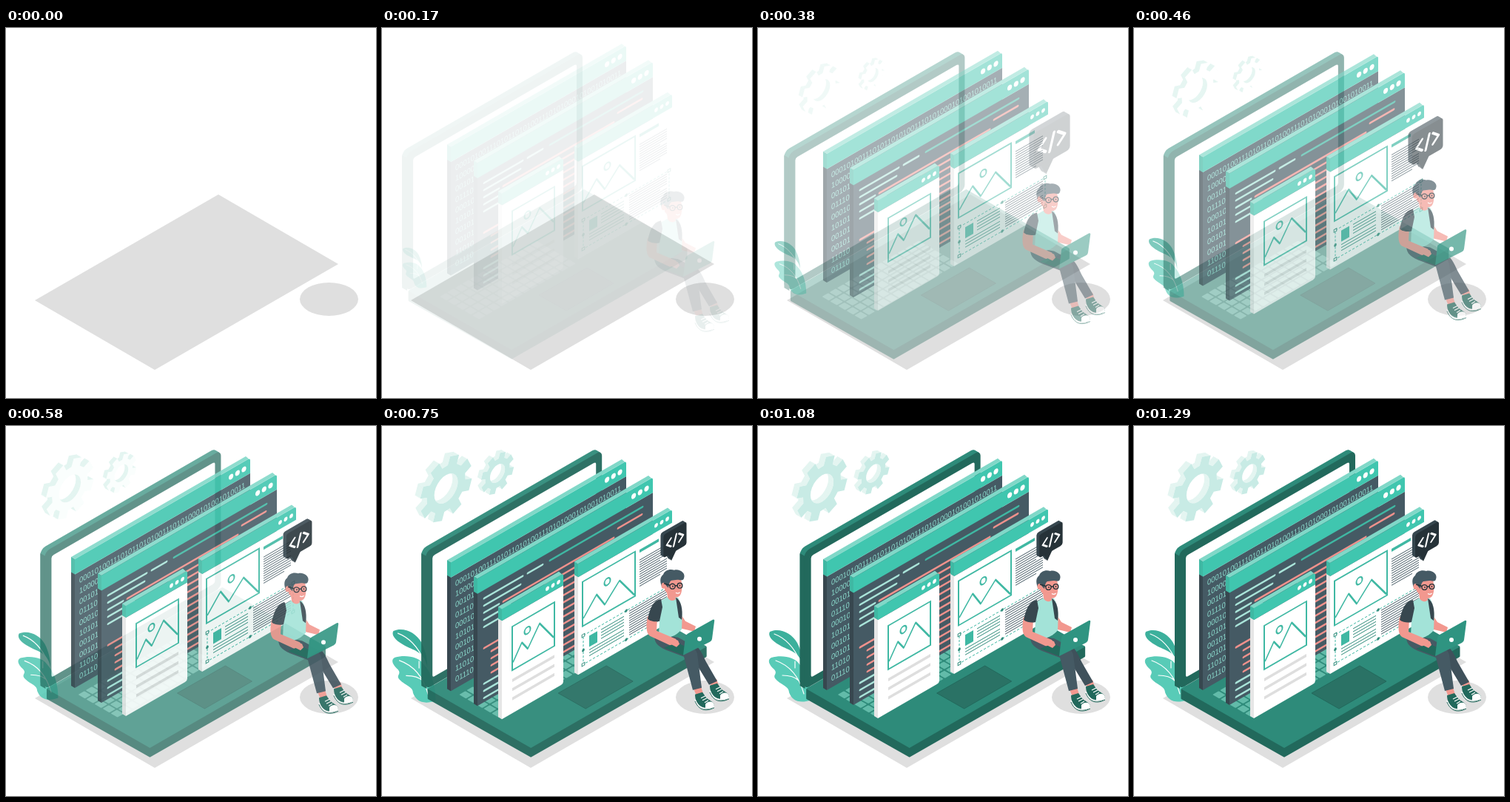
An HTML page that plays this animation: 500x500 px, repeating every 1.33 s.

```html
<!DOCTYPE html>
<html lang="en">
<head>
<meta charset="utf-8">
<title>Web development</title>
<style>
html, body { margin: 0; width: 100%; height: 100%; overflow: hidden; background: #fff; }
svg { display: block; width: 100vw; height: 100vh; }
</style>
</head>
<body>
<svg id="stage" viewBox="0 0 500 500"></svg>
<script>
const SLOPE = 0.577;
const TEAL = '#40c6af', MID = '#3fb8a3', GREEN = '#2e8b7a', DEEP = '#22695c';
const SLATE = '#455a64', INK = '#37474f', BLACK = '#263238', PINK = '#f0918c', PALE = '#a9e4d9';

// Shape helpers
const rect = (x, y, w, h, fill, more = '') =>
  `<rect x="${x}" y="${y}" width="${w}" height="${h}" fill="${fill}" ${more}/>`;
const poly = (pts, fill, more = '') => `<polygon points="${pts}" fill="${fill}" ${more}/>`;
const path = (d, fill, more = '') => `<path d="${d}" fill="${fill}" ${more}/>`;
const line = (pts, color, w = 2, more = '') =>
  `<polyline points="${pts}" fill="none" stroke="${color}" stroke-width="${w}" ${more}/>`;
const oval = (x, y, rx, ry, fill, more = '') =>
  `<ellipse cx="${x}" cy="${y}" rx="${rx}" ry="${ry}" fill="${fill}" ${more}/>`;
const group = (id, body) => `<g id="${id}">${body}</g>`;
const wall = (x, y, body) => `<g transform="matrix(1 -${SLOPE} 0 1 ${x} ${y})">${body}</g>`;
const many = (n, make) => Array.from({ length: n }, (_, i) => make(i)).join('');
const extrude = (depth, body) => many(depth, i =>
  `<g transform="translate(${i - depth} ${(i - depth) * SLOPE})">${body}</g>`);

function floor() {
  return poly('39,368 287,225 449,319 201,462', '#dfdfdf') + oval(436.5, 366.5, 39.5, 22.5, '#dfdfdf');
}

function plant() {
  const vein = 'stroke="#fff" stroke-width="1.2" stroke-linecap="round"';
  return path('M61 326C57 304 42 304 29 296C18 290 13 283 16 278C29 272 46 280 53 293C58 303 61 314 61 326Z', '#3cb09c') +
    path('M72 370C56 376 46 371 42 360C42 351 30 350 23 341C20 336 27 335 22 329C15 323 12 316 18 313C32 309 50 312 56 322C66 332 72 350 72 370Z', '#58cbb7') +
    path('M22 281C38 287 50 302 57 318M24 317C44 324 56 340 62 362M33 337C42 337 50 339 55 344M50 327L50 318', 'none', vein);
}

function laptop() {
  const shell = fill => wall(61, 170, rect(0, 0, 238, 186, fill, 'rx="7"'));
  const key = (i, j) => rect(i * 10.2, j * 11, 8.4, 9.2, '#62bba9', 'rx="1"');
  return extrude(6, shell(GREEN)) +
    poly('55,172 62,176 62,355 55,351', DEEP) + shell(DEEP) +
    wall(61, 170, rect(9, 11, 221, 164, '#fff', 'rx="3"')) +
    poly('65,356 203,435 439,299 439,311 203,446 65,368', DEEP, `stroke="${DEEP}" stroke-width="3" stroke-linejoin="round"`) +
    poly('65,355 301,219 439,298 203,434', GREEN, `stroke="${GREEN}" stroke-width="2" stroke-linejoin="round"`) +
    `<g transform="matrix(1 -${SLOPE} 1 ${SLOPE} 106 363)">${many(65, n => key(n % 13, Math.floor(n / 13)))}</g>` +
    poly('240,361 305,324 341,345 277,382', '#2a7265', `stroke="${DEEP}" stroke-width="1"`);
}

function panel(x, y, w, h, head, face, side, body) {
  const big = w > 200, r = big ? 3.6 : 2.8;
  const dot = i => oval(w - (big ? 8.5 : 6.5) - i * (big ? 8.7 : 7.5), head / 2, r * 0.866, r, '#fff');
  const rise = w * SLOPE;
  return poly(`${x},${y} ${x - 5},${y - 3} ${x - 5},${y + h - 3} ${x},${y + h}`, side) +
    poly(`${x},${y} ${x - 5},${y - 3} ${x - 5},${y + head - 3} ${x},${y + head}`, MID) +
    poly(`${x},${y} ${x - 5},${y - 3} ${x + w - 6},${y - 2.4 - rise} ${x + w - 2},${y + 1 - rise}`, '#80d8c8') +
    wall(x, y, path(`M0 ${head}H${w}V${h - 3}Q${w} ${h} ${w - 3} ${h}H0Z`, face) +
      path(`M0 0H${w - 3}Q${w} 0 ${w} 3V${head}H0Z`, TEAL) + many(3, dot) + body);
}

function binary() {
  const rows = ['00010100111010110101001110101000101001010011', '10000', '00101', '01110', '00010',
    '10101', '00101', '00101', '11010', '01110'];
  return `<g transform="matrix(.866 -.5 0 1 99 215.5)" fill="#8bdbcd" font-size="10.8" font-family="'Liberation Sans', Arial, sans-serif">` +
    rows.map((s, i) => `<text y="${i * 14.4}">${s}</text>`).join('') + '</g>';
}

function code() {
  const bar = (row, from, to, color) =>
    line(`${from},${32 + row * 9.6} ${to},${32 + row * 9.6}`, color, 2.8, 'stroke-linecap="round"');
  let out = bar(0, 9, 61, PALE) + bar(0, 68, 88, PALE) + bar(0, 98, 223, MID) +
    bar(1, 9, 58, PALE) + bar(1, 190, 222, PINK) +
    bar(2, 9, 29, PALE) + bar(2, 35, 184, PINK);
  for (let row = 3; row < 15; row++) {
    const pink = row > 6 && row < 12;
    if (row < 5 || row > 6) out += bar(row, pink && row > 7 ? 19 : 9, pink ? 60 : 44, pink ? PINK : PALE);
    out += bar(row, 92, 150, PINK);
  }
  return out;
}

const picture = (x, y, w, h, peaks, sunX, sunY) =>
  rect(x, y, w, h, 'none', `stroke="${MID}" stroke-width="2"`) +
  line(peaks, MID, 2, 'stroke-linejoin="round"') +
  oval(sunX, sunY, 4, 4.6, 'none', `stroke="${MID}" stroke-width="2"`);

function card() {
  return picture(14, 32, 57, 59, '15,81 27,61 35,74 51,49 70,79', 34.5, 49) +
    many(3, i => rect(14, 103 + i * 12.3, 57, 4, '#dedede'));
}

function page() {
  const text = (x1, x2, y, n, gap, color) =>
    many(n, i => line(`${x1},${y + i * gap} ${x2 - (i % 6 === 5 ? 9 : 0)},${y + i * gap}`, color, 1));
  const handle = (x, y) => rect(x - 1.8, y - 1.8, 3.6, 3.6, '#fff', `stroke="${GREEN}" stroke-width="1"`);
  const knob = (x, y) => oval(x, y, 1.8, 2, GREEN);
  return picture(6, 28, 71, 60, '7,78 25,56 36,76 56,55 76,86', 39.5, 47) +
    rect(83, 29, 26, 4, MID) +
    text(83, 120, 43, 12, 3.2, SLATE) + text(69, 120, 104, 11, 3.2, SLATE) +
    rect(7, 101, 116, 39, 'none', `stroke="${MID}" stroke-width="1" stroke-dasharray="3 2"`) +
    handle(7, 101) + handle(123, 140) + handle(7, 140) + handle(123, 101) +
    knob(7, 121) + knob(65, 101) + knob(65, 140) +
    rect(15, 106, 11, 15, MID) + text(31, 62, 107, 4, 4, GREEN) + text(15, 62, 125, 3, 4, GREEN);
}

function panels() {
  return panel(93, 183, 237, 174, 20.5, SLATE, INK, '') + binary() +
    panel(129, 205, 237, 172, 20.5, SLATE, INK, code()) +
    panel(265, 185, 127, 150, 18, '#fff', '#e6e6e6', page()) +
    panel(162, 246, 83, 149, 16, '#fff', '#e6e6e6', card());
}

function gear(cx, cy, r, depth, hole) {
  const at = (a, k) => {
    const u = r * k * Math.cos(a), v = r * k * Math.sin(a);
    return `${(cx + 0.866 * u).toFixed(1)} ${(cy + v - u / 2).toFixed(1)}`;
  };
  const step = Math.PI / 4;
  let d = 'M';
  for (let i = 0; i < 8; i++) {
    const a = i * step + 0.34;
    d += [[-0.25, 0.74], [-0.18, 1], [0.18, 1], [0.25, 0.74]].map(([o, k]) => at(a + o, k)).join('L') + 'L';
  }
  d = d.slice(0, -1) + 'ZM' + many(24, i => (i ? 'L' : '') + at(i * Math.PI / 12, hole)) + 'Z';
  const ring = (fill, more = '') => path(d, fill, 'fill-rule="evenodd" ' + more);
  return extrude(depth, ring('#e4f5f1')) + ring('#fff') + ring('#c8ebe5', 'class="tint"');
}

function bubble() {
  const shape = fill => wall(380, 147, rect(0, 0, 32, 32, fill, 'rx="3"') + poly('6,31 18,31 11,42', fill));
  const mark = 'stroke-linecap="round" stroke-linejoin="round"';
  return extrude(4, shape(INK)) + shape(BLACK) +
    wall(380, 147, line('10.5,10.5 4.5,16.5 10.5,22', '#fff', 2.4, mark) +
      line('18,9 14,24', '#fff', 2.4, mark) + line('21.5,10.5 27.5,16 21.5,22', '#fff', 2.4, mark));
}

function shoe(x, y) {
  return `<g transform="translate(${x} ${y})">` +
    path('M0 2L10 -1L15 6C18 10 25 11 26 16C26 21 17 24 10 21C4 18 0 10 0 2Z', DEEP) +
    path('M14 15C18 10 25 11 26 16C25 20 19 22 14 21Z', '#fff') +
    path('M0 9C4 19 12 25 26 18', 'none', 'stroke="#fff" stroke-width="1.6"') +
    path('M0 11C4 21 12 27 26 20', 'none', `stroke="${DEEP}" stroke-width="1"`) +
    path('M8 7L14 4M10 10L16 7M13 13L18 10', 'none', 'stroke="#fff" stroke-width="1.2"') + '</g>';
}

function head(skin) {
  const glass = 'stroke="#263238" stroke-width="1.4"';
  return '<g transform="translate(-1 1)">' +
    path('M383 211L389 206L405 207C407 216 407 226 403 230C398 234 390 231 387 227L383 222Z', skin) +
    path('M379 217C376 209 377 204 381 201C383 195 390 193 396 195C403 193 412 199 409 206C408 210 404 208 400 208L392 209C389 211 389 215 388 219L384 215Z', SLATE) +
    oval(381.5, 216, 3, 4, skin) +
    oval(393.5, 217, 3.6, 3.4, 'none', glass) + oval(403.5, 216, 3.3, 3.4, 'none', glass) +
    path('M382 213L390 215.5M397 216L400 216', 'none', glass) +
    oval(394, 217, 0.9, 1.1, BLACK) + oval(403.5, 216, 0.9, 1.1, BLACK) +
    path('M398 225.5C400 227 402 226.5 403.5 225', 'none', 'stroke="#fff" stroke-width="1.2"') + '</g>';
}

function person() {
  const skin = '#f2988f';
  return path('M442 346L452 343L455 352L446 356Z', skin) + path('M421 356L431 353L434 363L425 366Z', skin) +
    shoe(443, 350) + shoe(423, 362) +
    path('M404 294L424 298C430 302 434 312 438 320L453 346L442 351L420 315Z', '#3f515b') +
    path('M369 282C366 292 372 299 384 304L408 313L420 358L432 355L426 309C424 300 410 292 400 287Z', SLATE) +
    path('M404 256L410 265L424 272L422 279L405 275Z', skin) +
    path('M376 238L388 231L400 233C406 244 406 256 405 276C398 285 384 291 374 284Z', '#a3e3d8') +
    path('M397 233C404 237 407 248 405 263L401 260Z', INK) +
    path('M385 226L396 230L397 235C393 239 388 237 386 233Z', skin) +
    path('M359 258L372 261L371 278L397 289L402 296L399 301L388 297L362 285C356 281 357 268 359 258Z', skin) +
    path('M377 235C366 237 362 248 359 262C364 266 371 266 375 265L379 246Z', INK) +
    head(skin) +
    poly('381,301 398,294 412,300 407,311', DEEP) +
    path('M388 288L400 291L402 296L398 300L390 296Z', skin) +
    path('M413 282L447 263Q450 262 449 266L446 289Q446 291 443 293L407 311L410 286Q410 284 413 282Z', '#2f9481') +
    oval(429, 289, 3, 3, '#fff');
}

const stage = document.getElementById('stage');
stage.innerHTML = floor() + group('plant', plant()) + group('laptop', laptop()) + group('panels', panels()) +
  group('gearA', gear(86.5, 84.5, 40, 7, 0.45)) + group('gearB', gear(156, 64, 25.4, 5, 0.45)) +
  group('person', person()) + group('bubble', bubble());

// Cubic bezier easing, solved by bisection
function bezier(x1, y1, x2, y2) {
  const mix = (a, b, s) => 3 * (1 - s) * (1 - s) * s * a + 3 * (1 - s) * s * s * b + s * s * s;
  return x => {
    if (x <= 0) return 0;
    if (x >= 1) return 1;
    let lo = 0, hi = 1;
    for (let i = 0; i < 24; i++) {
      const s = (lo + hi) / 2;
      if (mix(x1, x2, s) < x) lo = s; else hi = s;
    }
    return mix(y1, y2, lo);
  };
}
const spring = bezier(0.36, -0.01, 0.5, 1.38);
const snap = bezier(0.36, 0, 0.1, 1.38);
const clamp = v => Math.max(0, Math.min(1, v));

const byId = id => document.getElementById(id);
const tints = document.querySelectorAll('.tint');
function place(id, opacity, transform) {
  const node = byId(id);
  node.setAttribute('opacity', clamp(opacity));
  node.setAttribute('transform', transform);
}
const zoom = (x, y, k) => `translate(${x} ${y}) scale(${k}) translate(${-x} ${-y})`;

const LOOP = 1330, STEP = LOOP / 32;
function draw(now) {
  const t = Math.floor((now % LOOP + 5) / STEP) % 32 * STEP;
  const p = spring(t / 1000), slow = spring(t / 1200), pop = snap((t - 200) / 950);
  const grow = 1 - 0.48 * (1 - p);
  place('plant', p, zoom(45, 324, grow));
  place('laptop', slow, `translate(${-30 * (1 - slow)} 0)`);
  place('panels', p, `translate(0 ${-25 * (1 - p)})`);
  place('person', p, `translate(0 ${28 * (1 - p)})`);
  place('bubble', pop, zoom(394, 155, 1 + 0.68 * (1 - pop)));
  const fade = (t - 260) / 220;
  place('gearA', fade, zoom(83, 82.5, grow));
  place('gearB', fade, zoom(153.5, 62.5, grow));
  tints.forEach(n => n.setAttribute('opacity', clamp((t - 570) / 130)));
}
function tick() {
  draw(performance.now());
  requestAnimationFrame(tick);
}
tick();
</script>
</body>
</html>
```
